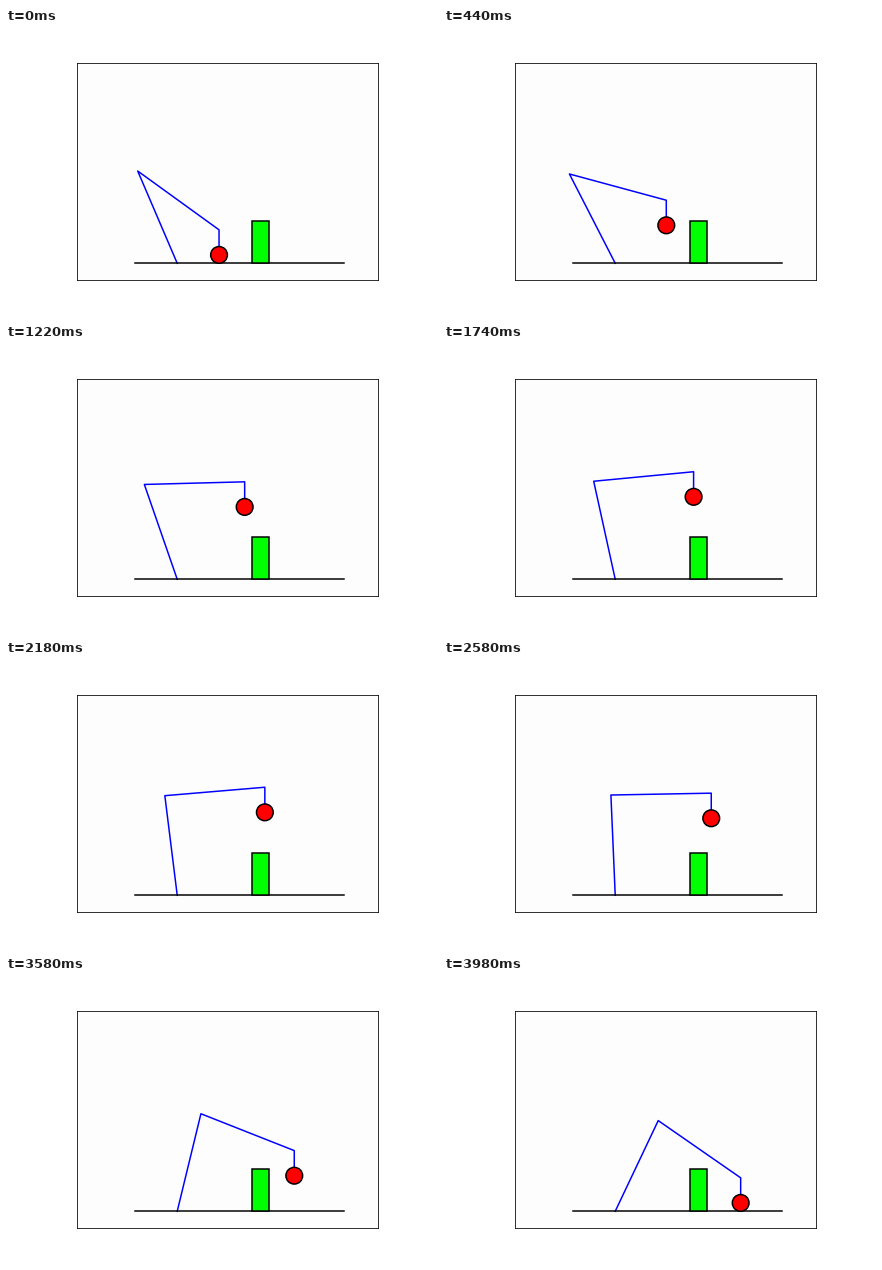
Recreate the animation shown at these times as a matplotlib script. Size 432 px wide and 288 px high, loop 4000 ms.

```python
import numpy as np
import matplotlib.pyplot as plt
from matplotlib.animation import FuncAnimation
from matplotlib.patches import Circle, Rectangle

FRAMES, INTERVAL = 200, 20
LINK, ROPE, RADIUS = 1.2, 0.3, 0.1
START, END, PEAK = 0.5, 1.5, 1.0

fig, ax = plt.subplots(figsize=(6, 4), dpi=72, facecolor="white")
fig.subplots_adjust(left=0.125, right=0.9, bottom=0.125, top=0.88)
ax.set(xlim=(-1.2, 2.4), ylim=(-0.2, 2.4), xticks=[], yticks=[],
       aspect="equal", facecolor="#fdfdfd")

arm, = ax.plot([], [], color="blue", lw=1.5, zorder=2)
ax.plot([-0.5, 2], [0, 0], color="black", lw=1.5, zorder=3)
ax.add_patch(Rectangle((0.9, 0), 0.2, 0.5, fc="lime", ec="black", lw=1.5, zorder=4))
ball = ax.add_patch(Circle((START, RADIUS), RADIUS, fc="red", ec="black", lw=1.5, zorder=5))


def load_position(s):
    """Straight in x, parabolic hop in y."""
    x = START + (END - START) * s
    y = RADIUS + 4 * (PEAK - RADIUS) * s * (1 - s)
    return x, y


def elbow_position(x, y):
    """Upper elbow of two equal links reaching from the origin to (x, y)."""
    d = np.hypot(x, y)
    h = np.sqrt(LINK**2 - d**2 / 4)
    return x / 2 - h * y / d, y / 2 + h * x / d


def update(i):
    x, y = load_position(i / (FRAMES - 1))
    ex, ey = elbow_position(x, y + ROPE)
    arm.set_data([0, ex, x, x], [0, ey, y + ROPE, y])
    ball.center = x, y
    return arm, ball


anim = FuncAnimation(fig, update, frames=FRAMES, interval=INTERVAL,
                     repeat=True, repeat_delay=0)
plt.show()
```
